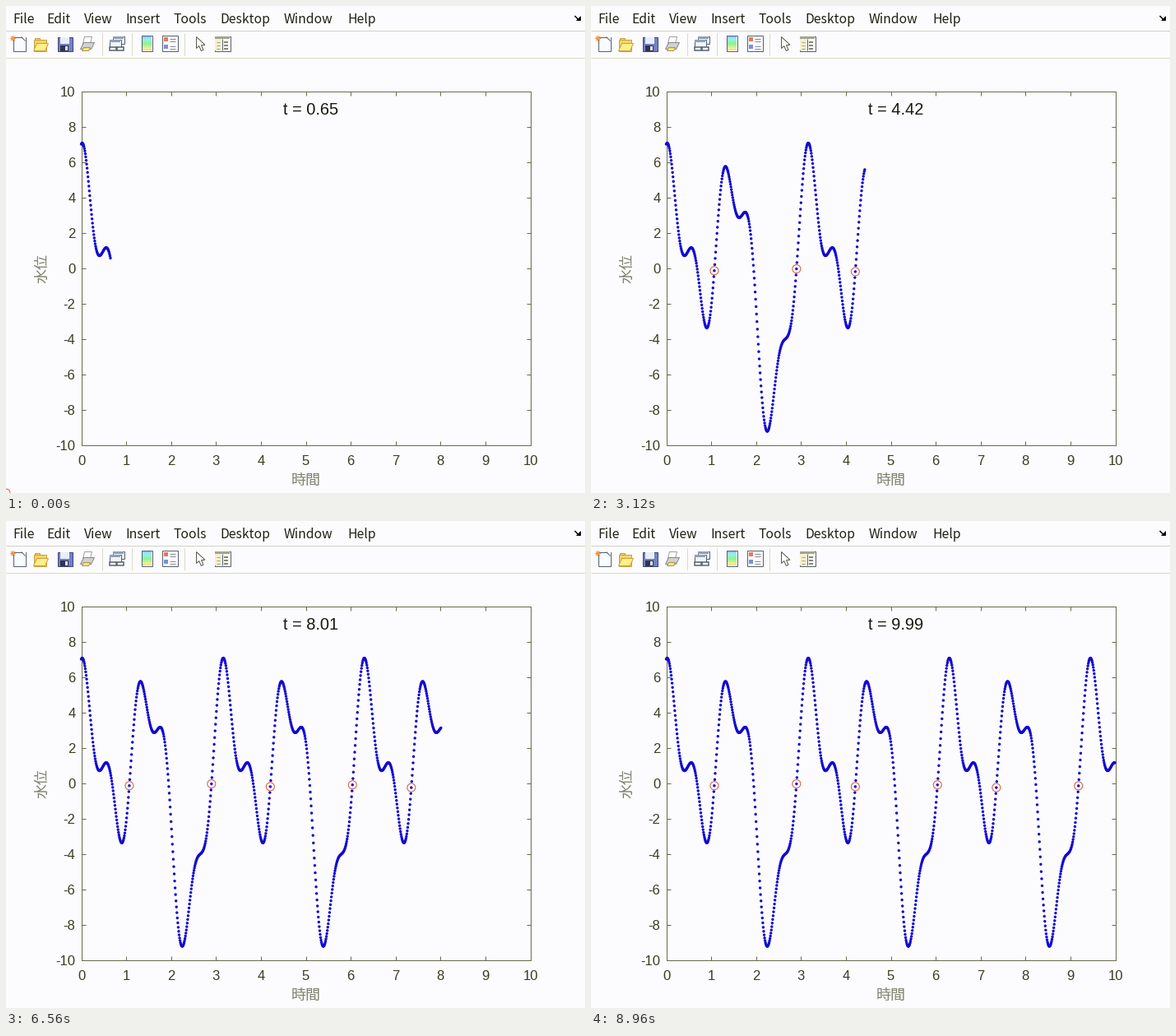
A matplotlib script that plays this animation: 704 by 592 pixels, repeating every 9 s.

```python
import numpy as np
import matplotlib.pyplot as plt
from matplotlib.animation import FuncAnimation
from matplotlib.collections import LineCollection
from matplotlib.colors import hsv_to_rgb
from matplotlib.patches import Polygon, Rectangle

W, H, DPI = 704, 592, 100
STEP, FRAMES = 40, 225
PX = 72 / DPI                      # points per pixel

BG = "#fcfcfe"
INK = "#3c3c24"
AXIS = "#6a6a4a"
BLUE = "#1208d0"
RED = "#e0533a"
SLATE = "#56626e"
RULE = "#dadac4"

LEFT, RIGHT, TOP, BOTTOM = 91.5, 637.5, 103.5, 533.5

fig = plt.figure(figsize=(W / DPI, H / DPI), dpi=DPI, facecolor=BG)
ax = fig.add_axes([0, 0, 1, 1])
ax.set_xlim(0, W)
ax.set_ylim(H, 0)
ax.set_autoscale_on(False)
ax.axis("off")


def to_x(t):
    return LEFT + (RIGHT - LEFT) * t / 10


def to_y(v):
    return BOTTOM - (BOTTOM - TOP) * (v + 10) / 20


def text(x, y, s, size, color=INK, font="Liberation Sans", **kw):
    return ax.text(x, y, s, fontsize=size * PX, color=color, family=font, **kw)


def line(x0, y0, x1, y1, color, width=1.0):
    ax.plot([x0, x1], [y0, y1], color=color, lw=width * PX,
            solid_capstyle="butt")


def poly(pts, fill, edge="none"):
    ax.add_patch(Polygon(pts, fc=fill, ec=edge, lw=PX, zorder=2))


def rect(x, y, w, h, fill, edge="none", width=1.0):
    ax.add_patch(Rectangle((x, y), w, h, fc=fill, ec=edge, lw=width * PX,
                           zorder=2))


def skew(x, y, w, h, lean, fill, edge):
    """Parallelogram whose top edge is shifted by lean."""
    poly([(x + lean, y), (x + lean + w, y), (x + w, y + h), (x, y + h)],
         fill, edge)


def window(x, y, w, h, fill, bar):
    rect(x, y, w, h, fill, SLATE)
    rect(x + 0.5, y + 0.5, w - 1, 2.5, bar)


def dot_layer(size, fill, edge, width, order):
    return ax.scatter([], [], s=(size * PX) ** 2, facecolors=fill,
                      edgecolors=edge, linewidths=width * PX, zorder=order)


def menu_bar():
    items = dict(File=8, Edit=49, View=94.5, Insert=145.5, Tools=203.5,
                 Desktop=260.5, Window=338, Help=415.5)
    for label, x in items.items():
        text(x, 20.6, label, 15.7, "#202014", "Noto Sans CJK JP",
             va="baseline")
    line(691.5, 12, 696, 16.5, "black", 1.5)
    poly([(698.5, 12), (698.5, 18), (692.5, 18)], "black")
    line(0, 29.5, W, 29.5, "#d2d2c8")
    line(0, 62.5, W, 62.5, RULE)
    for x in (116.5, 152.5, 216.5):
        line(x, 33, x, 60, RULE)


def new_icon(x):
    rect(x + 3.5, 37.5, 15, 17, "#f8fbff", SLATE)
    poly([(x + 13.5, 37), (x + 19, 37), (x + 19, 42.5)], BG)
    line(x + 13.5, 37.5, x + 18.5, 42.5, SLATE)
    a = np.arange(16) * np.pi / 8
    r = 3.2 + 1.2 * np.cos(8 * a)
    poly(np.c_[x + 3.5 + r * np.cos(a), 39.5 + r * np.sin(a)], "#f0964a")


def open_icon(x):
    rect(x + 2.5, 38.5, 6, 5, "#f4d468", "#c8a040")
    rect(x + 1.5, 40.5, 15, 14, "#f4d468", "#c8a040")
    skew(x + 1.5, 45.5, 14, 9, 4, "#fff08c", "#c8a040")


def save_icon(x):
    rect(x + 0.5, 37.5, 18, 17, "#7480c4", "#40467c")
    rect(x + 4, 38, 11, 8, "#e8eefa")
    rect(x + 4, 48, 10, 6.5, "#30364c")
    rect(x + 10, 49, 3, 5, "#e8e8f0")


def print_icon(x):
    skew(x + 3.5, 37.5, 9, 8, 2, "#fdfdfd", "#a0a0a0")
    skew(x + 0.5, 44.5, 13, 8, 4, "#d2d2cc", "#88888c")
    skew(x + 2.5, 50.5, 8, 4, 2, "#f4e488", "#a89850")


def link_icon(x):
    window(x + 5.5, 36.5, 14, 9, "#f0f4f8", "#90a0b4")
    window(x + 1.5, 40.5, 14, 9, "#f0f4f8", "#90a0b4")
    for k in range(2):
        rect(x + 1.5 + 9 * k, 49.5, 8, 4, BG, SLATE, 1.5)


def colorbar_icon(x):
    for k in range(18):
        rect(x + 0.5, 36 + k, 12, 1, hsv_to_rgb((0.6 - 0.028 * k, 0.4, 0.95)))
    rect(x + 0.5, 35.5, 13, 19, "none", SLATE)


def legend_icon(x):
    rect(x + 0.5, 35.5, 19, 19, "#fafaff", SLATE)
    for y, color in ((38, "#e4785c"), (47, "#7890d8")):
        rect(x + 3, y, 5, 5, color)
        for k in (1, 4):
            line(x + 10, y + k + 0.5, x + 17, y + k + 0.5, "#888c94")


def arrow_icon(x):
    poly([(x, 37.5), (x, 51.5), (x + 3.3, 48.6), (x + 5.8, 54.5),
          (x + 8.5, 53.3), (x + 6, 47.6), (x + 10.5, 47.3)],
         "#ffffff", "#58584c")


def inspector_icon(x):
    window(x + 0.5, 36.5, 19, 18, "#fcfcf4", "#a0a68c")
    rect(x + 1, 40, 8, 14, "#f4f0d0")
    line(x + 9.5, 40, x + 9.5, 54, SLATE)
    for y in np.arange(43.5, 54, 4):
        line(x + 3, y, x + 7, y, "#a8a478")
        line(x + 12, y, x + 17, y, "#606054", 1.5)


def plot_frame():
    segs = [[(LEFT, TOP), (RIGHT, TOP), (RIGHT, BOTTOM), (LEFT, BOTTOM),
             (LEFT, TOP)]]
    for k in range(11):
        x, v = to_x(k), 2 * k - 10
        y = to_y(v)
        for edge, tip in ((BOTTOM, -5), (TOP, 5)):
            segs.append([(x, edge), (x, edge + tip)])
        for edge, tip in ((LEFT, 5), (RIGHT, -5)):
            segs.append([(edge, y), (edge + tip, y)])
        text(x, 558, str(k), 16.67, ha="center", va="baseline")
        text(84.5, y + 6.5, str(v), 16.67, ha="right", va="baseline")
    ax.add_collection(LineCollection(segs, colors=AXIS, linewidths=PX))
    cjk = dict(size=18, color="#808070", font="Noto Sans CJK JP",
               ha="center", va="center")
    text(365, 577, "時間", **cjk)
    text(44, 319, "水位", rotation=90, **cjk)


menu_bar()
for draw, left in ((new_icon, 5), (open_icon, 32), (save_icon, 62),
                   (print_icon, 90), (link_icon, 124), (colorbar_icon, 164),
                   (legend_icon, 189), (arrow_icon, 231.5),
                   (inspector_icon, 253)):
    draw(left)
plot_frame()

# Water level sampled every 0.01, with its upward zero crossings
t = np.arange(1000) / 100
level = 3 * np.sin(2 * t) + 5 * np.cos(4 * t) + 2 * np.cos(10 * t)
points = np.c_[to_x(t), to_y(level)]
cross = np.flatnonzero((level[:-1] < 0) & (level[1:] >= 0))

dots = dot_layer(3.4, BLUE, "none", 0, 4)
rings = dot_layer(10, "none", RED, 1, 5)
clock = text(337, 132.5, "", 20, "#18180c", va="baseline")

# Plotting slows as points pile up: (wall ms, plotted time) key points
PACE = ((40, 0.65), (1640, 2.57), (3120, 4.42), (5160, 6.67), (6560, 8.01),
        (7320, 8.69), (8960, 9.99))


def update(i):
    n = int(round(100 * np.interp(i * STEP, *zip(*PACE))))
    dots.set_offsets(points[:n + 1])
    rings.set_offsets(points[cross[cross < n]])
    clock.set_text(f"t = {n / 100:.2f}")
    return dots, rings, clock


anim = FuncAnimation(fig, update, frames=FRAMES, interval=STEP, repeat=True,
                     repeat_delay=0, blit=False)
plt.show()
```
